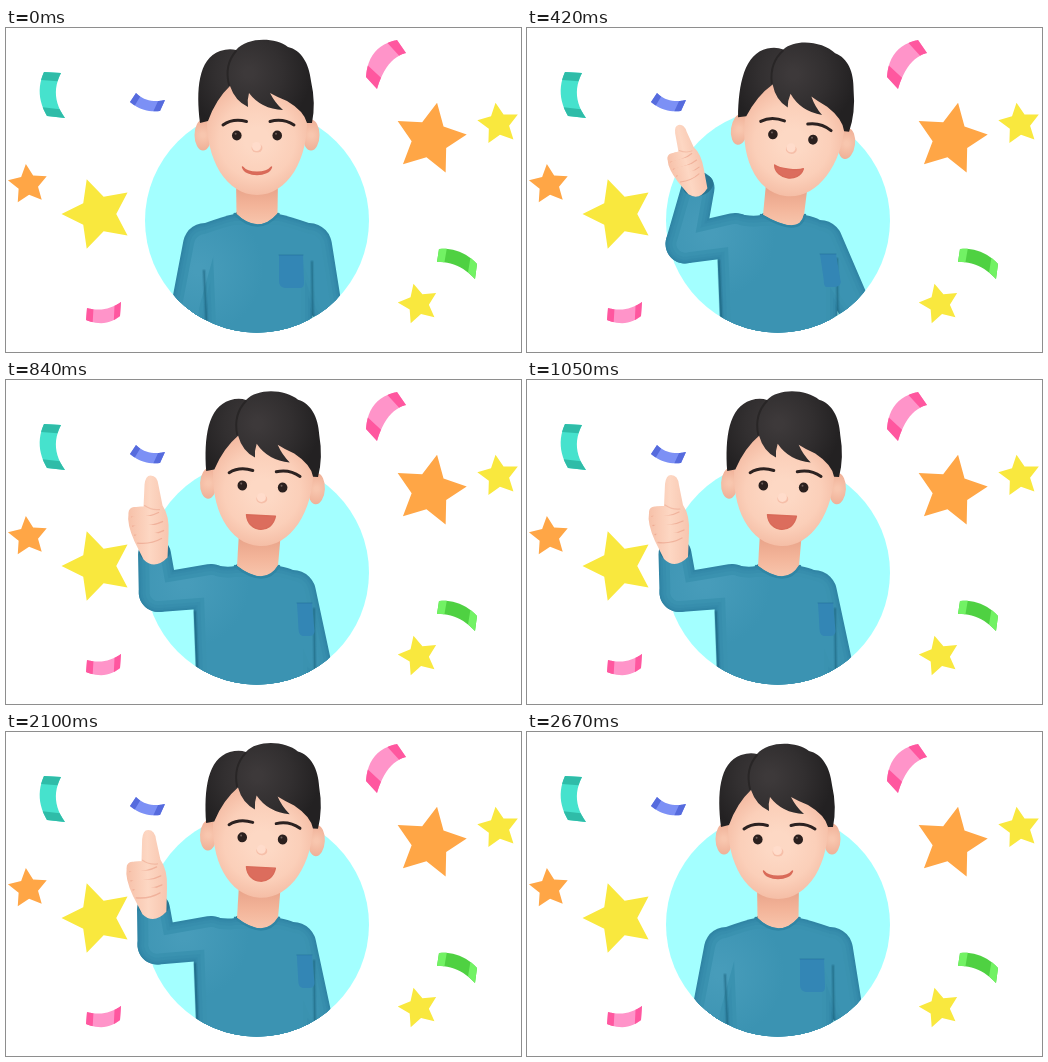
Animation, 515 px wide and 324 px high, one loop 2.7 s. Source, as an HTML page with a canvas:

```html
<!DOCTYPE html>
<html lang="en">
<head>
<meta charset="utf-8">
<title>Thumbs up</title>
<style>
html, body { margin: 0; width: 100%; height: 100%; overflow: hidden; background: #fff; }
canvas { display: block; width: 515px; height: 324px; }
</style>
</head>
<body>
<canvas id="stage" width="515" height="324"></canvas>
<script>
const ctx = document.getElementById('stage').getContext('2d');
const LOOP = 2700, STEP = 30, TAU = Math.PI * 2, DEG = Math.PI / 180;
const DISC = { x: 251, y: 192.6, r: 112 };
const lerp = (a, b, k) => a + (b - a) * k;
const smooth = k => k * k * (3 - 2 * k);

// Body poses: head [x, y, tilt], neck, shoulders, far elbow, torso sides, pocket [left, right, top]
const REST = { head: [251, 107, 0], mouth: 0, neck: [250.5, 186], near: [199, 217], far: [303, 218],
  elbow: [319, 277], sides: [196, 306], pocket: [273, 298, 227] };
const POINT = { head: [266, 108.5, 7.5], mouth: .55, neck: [256, 187], near: [208, 207], far: [293, 215],
  elbow: [328, 280], sides: [190, 310], pocket: [293, 310, 226] };
const THUMB = { head: [256.5, 106, 3], mouth: 1, neck: [251, 186], near: [205, 206], far: [287, 213],
  elbow: [308, 280], sides: [187, 308], pocket: [291, 307, 223] };
const HOP = { head: [253.5, 100.5, .5], mouth: .4, neck: [251.5, 180], near: [203, 208], far: [302, 211],
  elbow: [323, 272], sides: [194, 309], pocket: [281, 308, 219] };
const BODY = [[0, REST], [420, POINT], [660, THUMB], [2070, THUMB], [2430, HOP], [2610, REST], [LOOP, REST]];

// time, elbow x y, wrist x y, hand angle, hand scale
const ARM = [
  [0, 185, 277, 181, 330, 0, .6],
  [150, 164, 256, 145, 282, -10, .7],
  [270, 153, 230, 147, 196, -22, .8],
  [420, 158, 216, 171, 160, -13, .83],
  [660, 152.5, 212.5, 149, 175, 0, 1],
  [1050, 152, 212.5, 148, 174, 0, 1],
  [2070, 152, 212.5, 148, 174, 0, 1],
  [2100, 151, 213, 147.5, 177, -1, 1],
  [2250, 149, 225, 142, 200, -6, .9],
  [2340, 152, 243, 148, 268, -5, .6],
  [2430, 161, 253, 128, 288, 0, .6],
  [2610, 185, 277, 181, 330, 0, .6],
  [LOOP, 185, 277, 181, 330, 0, .6]
];

function span(keys, t) {
  let i = 0;
  while (i < keys.length - 2 && t >= keys[i + 1][0]) i++;
  return [keys[i], keys[i + 1], (t - keys[i][0]) / (keys[i + 1][0] - keys[i][0])];
}

function bodyAt(t) {
  const [a, b, k] = span(BODY, t), e = smooth(k), pose = {};
  for (const name in REST) {
    const from = a[1][name], to = b[1][name];
    pose[name] = Array.isArray(from) ? from.map((v, i) => lerp(v, to[i], e)) : lerp(from, to, e);
  }
  return pose;
}

function armAt(t) {
  const [a, b, k] = span(ARM, t);
  const [, ex, ey, wx, wy, angle, scale] = a.map((v, i) => lerp(v, b[i], k));
  return { elbow: [ex, ey], wrist: [wx, wy], angle, scale };
}

function fillPath(d, style) {
  ctx.fillStyle = style;
  ctx.fill(new Path2D(d));
}

function strokePath(d, style, width) {
  ctx.strokeStyle = style;
  ctx.lineWidth = width;
  ctx.lineCap = ctx.lineJoin = 'round';
  ctx.stroke(new Path2D(d));
}

function oval(x, y, rx, ry, style, turn = 0) {
  ctx.fillStyle = style;
  ctx.beginPath();
  ctx.ellipse(x, y, rx, ry, turn, 0, TAU);
  ctx.fill();
}

function withStops(gradient, colors) {
  colors.forEach((c, i) => gradient.addColorStop(i / (colors.length - 1), c));
  return gradient;
}
const radial = (x, y, r0, r1, ...colors) => withStops(ctx.createRadialGradient(x, y, r0, x, y, r1), colors);
const linear = (x0, y0, x1, y1, ...colors) => withStops(ctx.createLinearGradient(x0, y0, x1, y1), colors);

function star(x, y, r, degrees, color) {
  ctx.fillStyle = color;
  ctx.beginPath();
  for (let i = 0; i < 10; i++) {
    const a = (degrees + i * 36) * DEG, d = i % 2 ? r * .5 : r;
    ctx.lineTo(x + d * Math.cos(a), y + d * Math.sin(a));
  }
  ctx.fill();
}

// A bent strip between two quadratic edges, with its ends in another tone
function ribbon(edgeA, edgeB, color, endColor) {
  const at = ([x0, y0, cx, cy, x1, y1], t) => {
    const u = 1 - t;
    return [u * u * x0 + 2 * u * t * cx + t * t * x1, u * u * y0 + 2 * u * t * cy + t * t * y1];
  };
  const strip = (from, to, style) => {
    ctx.fillStyle = style;
    ctx.beginPath();
    for (let i = 0; i <= 12; i++) ctx.lineTo(...at(edgeA, lerp(from, to, i / 12)));
    for (let i = 12; i >= 0; i--) ctx.lineTo(...at(edgeB, lerp(from, to, i / 12)));
    ctx.fill();
  };
  strip(0, 1, color);
  strip(0, .18, endColor);
  strip(.8, 1, endColor);
}

function confetti() {
  star(424, 111, 37, -79, '#ffa646');
  star(92, 186, 36.5, -108, '#f9e83e');
  star(22, 156.5, 20.5, -96, '#ffa646');
  star(492.5, 96, 21.5, -98, '#f9e83e');
  star(412.5, 276, 20.8, -104, '#f9e83e');
  ribbon([38, 44, 28, 66, 41, 88], [55, 45, 43, 68, 59, 90], '#46e2cd', '#2fbca8');
  ribbon([130, 65, 141, 76, 159, 72], [124, 74, 137, 85, 154, 83], '#7c90f5', '#566bdd');
  ribbon([391, 12, 362, 18, 360, 49], [400, 25, 380, 30, 371, 61], '#ff94c9', '#ff579f');
  ribbon([81, 280, 99, 285, 115, 274], [80, 292, 99, 300, 114, 288], '#ff94c9', '#ff579f');
  ribbon([433, 221, 455, 219, 471, 236], [431, 234, 452, 233, 469, 251], '#4fd142', '#72f264');
}

// Outline of two circles of different size joined by their tangents
function limb([x1, y1], r1, [x2, y2], r2) {
  const a = Math.atan2(y2 - y1, x2 - x1), d = Math.hypot(x2 - x1, y2 - y1) || 1;
  const off = Math.acos(Math.max(-1, Math.min(1, (r1 - r2) / d)));
  ctx.beginPath();
  ctx.arc(x1, y1, r1, a + off, a - off + TAU);
  ctx.arc(x2, y2, r2, a - off, a + off);
  ctx.fill();
}

function torso(p, inset) {
  const [nx, ny] = p.neck, [left, right] = p.sides;
  ctx.beginPath();
  ctx.moveTo(nx - 22, ny + inset);
  ctx.quadraticCurveTo(nx - 32, ny + 2 + inset, p.near[0], p.near[1] - 22 + inset);
  ctx.lineTo(left + inset, p.near[1] + 8);
  ctx.lineTo(left + 4 + inset, 320);
  ctx.lineTo(right - inset, 320);
  ctx.lineTo(right - inset, p.far[1] + 8);
  ctx.lineTo(p.far[0], p.far[1] - 23 + inset);
  ctx.quadraticCurveTo(nx + 32, ny + 2 + inset, nx + 22, ny + inset);
  ctx.fill();
}

function shirt(p, arm) {
  const lightX = (p.near[0] + arm.elbow[0]) / 2, lightY = (p.near[1] + arm.elbow[1]) / 2 - 6;
  const layers = [[0, '#3085a5'], [2, '#348aaa'], [4, '#378ead'], [7, '#3a92b0'],
    [11, radial(lightX, lightY, 5, 65, '#479cba', '#3b93b2')]];
  for (const [inset, color] of layers) {
    ctx.fillStyle = color;
    limb(p.far, 23 - inset, p.elbow, 16.5 - inset);
    limb(p.near, 22 - inset, arm.elbow, 19.5 - inset);
    limb(arm.elbow, 19.5 - inset, arm.wrist, 16.5 - inset);
    torso(p, inset);
  }
  const [left, right] = p.sides;
  const creases = `M${left + 2} ${p.near[1] + 26}L${left + 5} 305M${right} ${p.far[1] + 16}L${right + 1} 305`;
  strokePath(creases, 'rgba(24,92,118,.18)', 4);
  strokePath(creases, 'rgba(24,92,118,.4)', 1.6);

  const [x0, x1, y] = p.pocket, slant = p.head[2] * .5;
  fillPath(`M${x0} ${y}H${x1 - 1}L${x1 + slant} ${y + 28}Q${x1 + slant} ${y + 33} ${x1 - 4} ${y + 33}` +
    `H${x0 + 6}Q${x0 + slant} ${y + 32} ${x0 + slant} ${y + 26}Z`, '#3386b5');
  strokePath(`M${x0} ${y}H${x1 - 1}`, 'rgba(30,105,150,.35)', 1.3);
}

function neck(p) {
  const [nx, ny] = p.neck, [hx, hy, tilt] = p.head;
  const topX = hx - Math.sin(tilt * DEG) * 42, topY = hy + 42, dip = nx + 2 + tilt * 2;
  oval(nx, ny, 22, 4, '#20677f');
  fillPath(`M${topX - 21} ${topY}L${nx - 20} ${ny}Q${dip} ${ny + 21} ${nx + 21} ${ny}L${topX + 21} ${topY}Z`,
    linear(0, hy + 54, 0, ny + 8, '#eaa58b', '#f3b499', '#f7c3aa'));
  strokePath(`M${nx - 22} ${ny}Q${dip} ${ny + 23} ${nx + 22} ${ny}`, '#2f86a5', 2.5);
}

function head(p, blink) {
  const [x, y, tilt] = p.head, m = p.mouth;
  ctx.save();
  ctx.translate(x, y);
  ctx.rotate(tilt * DEG);
  for (const side of [-1, 1]) {
    oval(side * 54, 0, 8.5, 15.5, radial(side * 54, 0, 2, 16, '#f8c6ae', '#efaf96'));
  }
  fillPath('M-50-20C-52 25-30 60 0 60C30 60 52 25 50-20C45-66-45-66-50-20Z',
    radial(0, 5, 12, 64, '#fdd8c4', '#fbcfb9', '#f2b59c'));

  fillPath('M-57-12C-61-45-59-76-37-84Q-28-87-21-85C-10-98 18-98 31-88C44-85 52-72 54-54Q59-32 55-12L50-12' +
    'Q47-24 30-34Q20-38 13-42Q18-32 26-25Q4-26-8-42Q-10-35-9-28Q-22-34-27-49Q-41-36-49-14Z',
    radial(-8, -62, 5, 62, '#3d393a', '#322f30', '#232122'));
  strokePath('M-21-84Q-33-70-28-50', 'rgba(20,18,19,.4)', 2);

  const outer = lerp(-10, -11.5, m), mid = outer - 7, inner = outer - 3.5;
  strokePath(`M-34 ${outer}Q-24 ${mid}-10.5 ${inner}M13 ${inner}Q26 ${mid} 37 ${outer}`, '#2c2221', 3);
  for (const side of [-1, 1]) {
    oval(side * 20.2, .5, 4.8, 5 * (1 - .82 * blink), '#2b201e');
    if (blink < .3) oval(side * 20.2 - 1.2, -1.3, 1, 1, '#6d5f5b');
  }
  oval(0, 13, 5.5, 4.5, '#f6bfa9');
  oval(-.5, 11.5, 4.5, 4.5, '#ffdccb');

  const corner = lerp(32, 29.5, m), upper = lerp(39, 29.5, m), lower = lerp(42, 48, m);
  const lips = `M-14.5 ${corner}C-9 ${upper} 9 ${upper} 14.5 ${corner}C12 ${lower}-12 ${lower}-14.5 ${corner}Z`;
  fillPath(lips, '#dc6d5d');
  strokePath(lips, '#d96a58', 1.4);
  ctx.restore();
}

function hand(arm) {
  const [x, y] = arm.wrist;
  oval(x, y - 3, 15.5, 11, '#277592', arm.angle * DEG);
  ctx.save();
  ctx.translate(x, y + 9 * arm.scale);
  ctx.rotate(arm.angle * DEG);
  ctx.scale(arm.scale, arm.scale);
  const skin = linear(-26, 0, 16, 0, '#f7c1a9', '#fdd7c3', '#f7c3ac');
  fillPath('M-11-57L-10-79Q-9-88-4-88Q3-88 4-78L8-58Q15-48 14-30L13-6Q0 7-11-4Q-16-14-20-22' +
    'Q-28-40-26-50Q-24-58-11-57Z', skin);
  const fingers = [[-26, -51, 30], [-25, -42, 33], [-23, -33, 32], [-20, -25, 27]];
  for (const [fx, fy, length] of fingers) {
    ctx.fillStyle = skin;
    ctx.beginPath();
    ctx.roundRect(fx, fy - 5.5, length, 11, 5.5);
    ctx.fill();
    strokePath(`M${fx + 3} ${fy + 4.5}Q${fx + length * .6} ${fy + 6} ${fx + length} ${fy}`, 'rgba(226,140,116,.45)', 1.3);
  }
  strokePath('M-10-58Q-3-53 5-54', 'rgba(226,140,116,.35)', 1.2);
  ctx.restore();
}

function draw(t) {
  const p = bodyAt(t), arm = armAt(t);
  const blink = t > 1200 && t < 1530 ? Math.sin((t - 1200) / 330 * Math.PI) ** 2 : 0;
  ctx.fillStyle = '#fff';
  ctx.fillRect(0, 0, 515, 324);
  confetti();
  oval(DISC.x, DISC.y, DISC.r, DISC.r, '#a3ffff');

  // The figure may leave the disc only above the elbow line
  const line = 236, edge = Math.asin((line - DISC.y) / DISC.r);
  ctx.save();
  ctx.beginPath();
  ctx.rect(0, 0, 515, line);
  ctx.moveTo(DISC.x + DISC.r * Math.cos(edge), line);
  ctx.arc(DISC.x, DISC.y, DISC.r, edge, Math.PI - edge);
  ctx.clip();
  shirt(p, arm);
  neck(p);
  head(p, blink);
  hand(arm);
  ctx.restore();
}

function tick(now) {
  draw(Math.floor((now % LOOP) / STEP) * STEP);
  requestAnimationFrame(tick);
}
draw(0);
requestAnimationFrame(tick);
</script>
</body>
</html>
```
